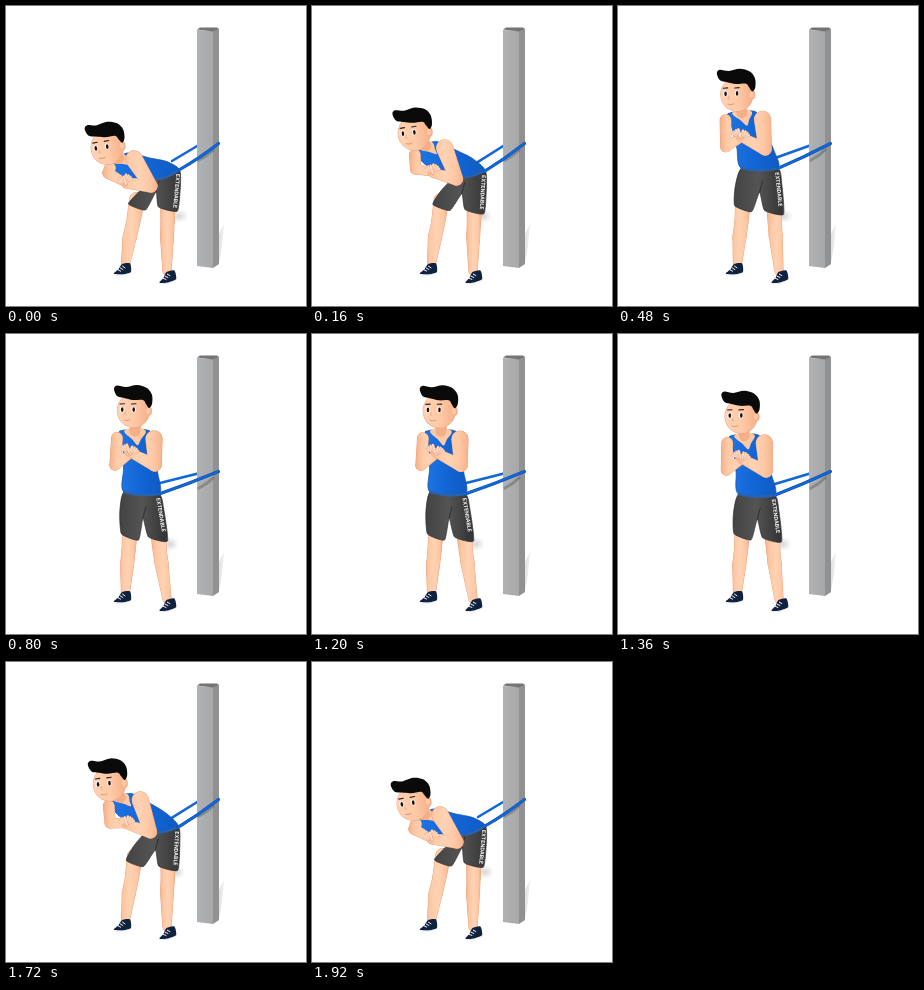
Recreate the animation shown at these times as an HTML page with a canvas. Size 300x300 px, loop 2240 ms.

```html
<!DOCTYPE html>
<html lang="en">
<head>
<meta charset="utf-8">
<title>Resistance band hip hinge</title>
<style>
html, body { margin: 0; width: 100%; height: 100%; overflow: hidden; background: #fff; }
canvas { display: block; width: 300px; height: 300px; }
</style>
</head>
<body>
<canvas id="stage"></canvas>
<script>
const LOOP = 2240, STEP = 40, RISE = 800, TURN = 1920;
const SKIN = '#ffc9a6', SKIN_LIGHT = '#ffd2b3', SKIN_DARK = '#f3b088', SKIN_EDGE = '#e79e78';
const BLUE = '#1266d6', BLUE_EDGE = '#0d50ae';
const canvas = document.getElementById('stage');
const ctx = canvas.getContext('2d');
const dpr = window.devicePixelRatio || 1;
canvas.width = canvas.height = 300 * dpr;

// A joint travels from its bent to its upright place; bow pushes the middle of the way aside
const joint = (bent, upright, bow = [0, 0]) => ({ bent, upright, bow });
const CHEST = [-4, 0], HIP = [4, 3];
const JOINTS = {
  head: joint([101, 137], [128, 72], [-7, 1]),
  strapFront: joint([105, 158], [114, 97], CHEST),
  strapRear: joint([121, 147], [144, 97], CHEST),
  back: joint([144, 152], [148, 120]),
  chest: joint([114, 171], [117, 112], CHEST),
  waistFront: joint([150, 173], [118, 158], [0, 3]),
  waistRear: joint([173, 164], [153, 160], [6, 3]),
  crotch: joint([150, 186], [137, 184], HIP),
  hemFront: joint([131, 201], [124, 203]),
  hemRear: joint([162, 203], [152, 205], HIP),
  calfFront: joint([123.5, 232], [121, 231]),
  calfRear: joint([161, 231], [155.5, 229], [2, 0]),
  shoulder: joint([128, 153], [148, 105]),
  elbow: joint([145, 180], [149, 131], [-2, 6]),
  wrist: joint([120, 178], [123, 118], [0, 4]),
  farShoulder: joint([104, 162], [111, 104], CHEST),
  farElbow: joint([102, 167], [109, 131], [0, 6]),
  farWrist: joint([118, 176], [124, 120], [0, 4])
};

const mix = (a, b, k) => a + (b - a) * k;
const between = (a, b, k = 0.5) => a.map((v, i) => mix(v, b[i], k));
const shift = ([x, y], dx, dy) => [x + dx, y + dy];

// Rises, then runs the same path backwards
function progress(t) {
  const x = Math.max(0, Math.min(1, Math.min(t, TURN - t) / RISE));
  return 1 - (1 - x ** 1.5) ** 2.8;
}

function pose(p) {
  const swing = 4 * p * (1 - p), out = {};
  for (const [name, j] of Object.entries(JOINTS)) {
    out[name] = shift(between(j.bent, j.upright, p), j.bow[0] * swing, j.bow[1] * swing);
  }
  return out;
}

function shade(x0, x1, ...colors) {
  const g = ctx.createLinearGradient(x0, 0, x1, 0);
  colors.forEach((c, i) => g.addColorStop(i / (colors.length - 1), c));
  return g;
}

// Closed curve through the points; bend 0 gives straight sides
function blob(pts, fill, bend = 0.15, edge) {
  const n = pts.length, at = i => pts[(i + n) % n];
  ctx.beginPath();
  ctx.moveTo(...pts[0]);
  for (let i = 0; i < n; i++) {
    const [a, b, c, d] = [-1, 0, 1, 2].map(k => at(i + k));
    ctx.bezierCurveTo(b[0] + (c[0] - a[0]) * bend, b[1] + (c[1] - a[1]) * bend,
      c[0] - (d[0] - b[0]) * bend, c[1] - (d[1] - b[1]) * bend, ...c);
  }
  ctx.closePath();
  ctx.fillStyle = fill;
  ctx.fill();
  if (edge) {
    ctx.strokeStyle = edge;
    ctx.lineWidth = 0.7;
    ctx.stroke();
  }
}

function line(pts, color, width) {
  ctx.beginPath();
  pts.forEach(q => ctx.lineTo(...q));
  ctx.strokeStyle = color;
  ctx.lineWidth = width;
  ctx.stroke();
}

function curve(a, bend, b, color, width) {
  ctx.beginPath();
  ctx.moveTo(...a);
  ctx.quadraticCurveTo(...bend, ...b);
  ctx.strokeStyle = color;
  ctx.lineWidth = width;
  ctx.stroke();
}

function oval(x, y, rx, ry, fill) {
  ctx.beginPath();
  ctx.ellipse(x, y, rx, ry, 0, 0, Math.PI * 2);
  ctx.fillStyle = fill;
  ctx.fill();
}

// Tapered round limb through its joints
function limb(pts, radii) {
  const xs = pts.map(q => q[0]);
  const skin = shade(Math.min(...xs) - radii[0], Math.max(...xs) + radii[0],
    SKIN_DARK, SKIN, SKIN_LIGHT, SKIN, SKIN_DARK);
  for (const [grow, fill] of [[0.4, SKIN_EDGE], [0, skin]]) {
    ctx.fillStyle = fill;
    for (let i = 1; i < pts.length; i++) {
      const [a, b] = [pts[i - 1], pts[i]];
      const turn = Math.atan2(b[1] - a[1], b[0] - a[0]), q = Math.PI / 2;
      ctx.beginPath();
      ctx.arc(...a, radii[i - 1] + grow, turn + q, turn + 3 * q);
      ctx.arc(...b, radii[i] + grow, turn - q, turn + q);
      ctx.fill();
    }
  }
}

function shadow(x, y, rx, ry) {
  ctx.save();
  ctx.translate(x, y);
  ctx.scale(rx, ry);
  const g = ctx.createRadialGradient(0, 0, 0, 0, 0, 1);
  g.addColorStop(0, 'rgba(90,90,90,.25)');
  g.addColorStop(1, 'rgba(90,90,90,0)');
  oval(0, 0, 1, 1, g);
  ctx.restore();
}

function post() {
  blob([[213, 256], [212, 231], [218, 218], [216, 240]], shade(212, 219, '#dedede', '#f5f5f5'), 0.05);
  blob([[191, 24], [207, 25], [207, 262], [191, 260]], shade(191, 207, '#b0b1b2', '#a7a8a9'), 0);
  blob([[207, 25], [213, 23], [213, 258], [207, 262]], '#919191', 0);
  blob([[191, 23.5], [194, 21.5], [211, 21.5], [213, 23], [207, 25.5]], '#747474', 0);
}

function shoe(x, y, turn) {
  ctx.save();
  ctx.translate(x, y);
  ctx.rotate(turn);
  blob([[-9, 4], [-4, 0], [0, -5], [8, -5], [8, 4], [0, 5.5]], '#10203f', 0.12);
  line([[-8.5, 5.3], [0, 6.2], [8, 4.6]], '#e4e8ee', 0.9);
  for (let i = 0; i < 3; i++) line([[-4.5 + i * 2.3, 0.5 - i * 1.7], [-2 + i * 2.3, 2 - i * 1.5]], '#fff', 0.9);
  ctx.restore();
}

function leg(hem, calf, ankle) {
  limb([shift(hem, 0, -7), between(hem, calf, 0.5), calf, ankle], [7.5, 6.6, 6.6, 4.2]);
}

function drawShorts(j) {
  const hemOut = shift(j.hemRear, 9.5, 2), hemEdge = shift(j.hemFront, -8.5, -3);
  const hip = shift(between(j.waistRear, hemOut, 0.3), 2, 0);
  blob([j.waistFront, j.waistRear, hip, hemOut, shift(j.hemRear, -9.5, -2), j.crotch,
    shift(j.hemFront, 8.5, 3), hemEdge, shift(between(j.waistFront, hemEdge), -3, 0)],
    shade(hemEdge[0], hip[0], '#444', '#545454', '#363636'), 0.08, '#2f2f2f');
  curve(j.crotch, shift(j.crotch, 1, -5), shift(j.crotch, 3, -11), '#303030', 1);

  const top = shift(j.waistRear, -1.2, 4), end = shift(hemOut, -2.8, -2);
  ctx.save();
  ctx.translate(...top);
  ctx.rotate(Math.atan2(end[1] - top[1], end[0] - top[0]));
  ctx.font = 'bold 5.2px Inter, Arial, sans-serif';
  ctx.textBaseline = 'middle';
  ctx.fillStyle = '#fff';
  ctx.fillText('EXTENDABLE', 0, 0);
  ctx.restore();
}

function drawTorso(j) {
  const { strapFront: front, strapRear: rear } = j;
  const collar = between(front, rear);
  const dip = between(collar, between(j.chest, j.back), 0.75);
  const side = shift(between(j.back, j.waistRear, 0.55), 1, -3);
  blob([front, rear, j.back, side, j.waistRear, j.waistFront, between(j.chest, j.waistFront), j.chest],
    shade(front[0], j.waistRear[0], '#1f74e4', BLUE, '#0f5cc4'), 0.13, BLUE_EDGE);
  const inFront = between(front, rear, 0.14), inRear = between(rear, front, 0.14);
  blob([inFront, between(inFront, dip, 0.6), dip, between(inRear, dip, 0.6), inRear,
    shift(collar, 0, -4)], SKIN, 0.17);
}

function drawBand(j, p) {
  const hook = [212.5, 137.5], end = j.waistRear;
  const sag = shift(between(hook, end), 0, mix(2, 1, p));
  curve([207, 144], [201, 150], [193, 154], 'rgba(70,70,70,.35)', 3);
  curve(j.waistFront, shift(between(j.waistFront, end), 0, 4), end, '#2a62ad', 2.4);
  curve(hook, sag, end, BLUE_EDGE, 3.1);
  curve(hook, sag, end, BLUE, 2.3);
}

function hand([x, y], side) {
  for (let i = 0; i < 4; i++) {
    const a = -Math.PI / 2 + side * (1.15 - i * 0.3);
    const tip = [x + Math.cos(a) * 8.5, y + Math.sin(a) * 7.5];
    line([[x, y], tip], SKIN_EDGE, 2.8);
    line([[x, y], tip], '#ffdcc6', 2.1);
  }
}

function drawHead(at, tilt) {
  ctx.save();
  ctx.translate(...at);
  ctx.rotate(tilt);
  oval(15, 5, 3, 4.6, SKIN_DARK);
  oval(-0.5, 4.5, 16.6, 17.4, SKIN_EDGE);
  oval(-0.5, 4.5, 16.2, 17, shade(-16, 16, SKIN_LIGHT, SKIN, SKIN_DARK));
  oval(14.3, 5, 2, 3.3, SKIN);
  blob([[-20, -17], [-17, -20.5], [-8, -19], [3, -21], [13, -18], [18, -11], [18, -2], [15, 2],
    [12, -2], [9, -6], [-1, -6], [-10, -8], [-17, -10]], '#0a0a0a', 0.16);
  for (const x of [-12, -0.5]) {
    oval(x, 3.5, 2.2, 3, '#fff');
    oval(x + 0.2, 3.6, 1.3, 2.4, '#17110f');
    line([[x - 2, -2], [x + 2.5, -2.2]], '#33211a', 1.1);
  }
  curve([-8.5, 6], [-11, 9], [-8, 9], '#eba07a', 0.8);
  curve([-10, 14], [-7, 15.5], [-4, 14], '#d98a6c', 0.8);
  ctx.restore();
}

function draw(t) {
  const p = progress(t), j = pose(p);
  ctx.setTransform(dpr, 0, 0, dpr, 0, 0);
  ctx.fillStyle = '#fff';
  ctx.fillRect(0, 0, 300, 300);
  ctx.lineCap = ctx.lineJoin = 'round';

  shadow(mix(173, 164, p), 210, 9, 7);
  line([shift(j.waistRear, -7, -9), [192, 139.5]], BLUE, 2.6);
  post();
  leg(j.hemFront, j.calfFront, [119.5, 258]);
  leg(j.hemRear, j.calfRear, [161, 265]);
  shoe(116.5, 263, -0.08);
  shoe(161.5, 271, -0.2);
  drawShorts(j);
  drawTorso(j);
  drawBand(j, p);

  line([between(j.strapFront, j.strapRear), shift(j.head, 2, 14)], SKIN_DARK, 11);
  limb([j.farShoulder, j.farElbow, j.farWrist], [5.5, 5.2, 4]);
  limb([j.shoulder, j.elbow, j.wrist], [8.3, 6.3, 4.2]);
  hand(j.farWrist, 1);
  hand(j.wrist, -1);
  drawHead(j.head, mix(-0.15, 0, p));
}

const start = performance.now();
function frame(now) {
  const t = Math.max(0, now - start) % LOOP;
  draw(Math.floor(t / STEP) * STEP);
  requestAnimationFrame(frame);
}
frame(start);
</script>
</body>
</html>
```
